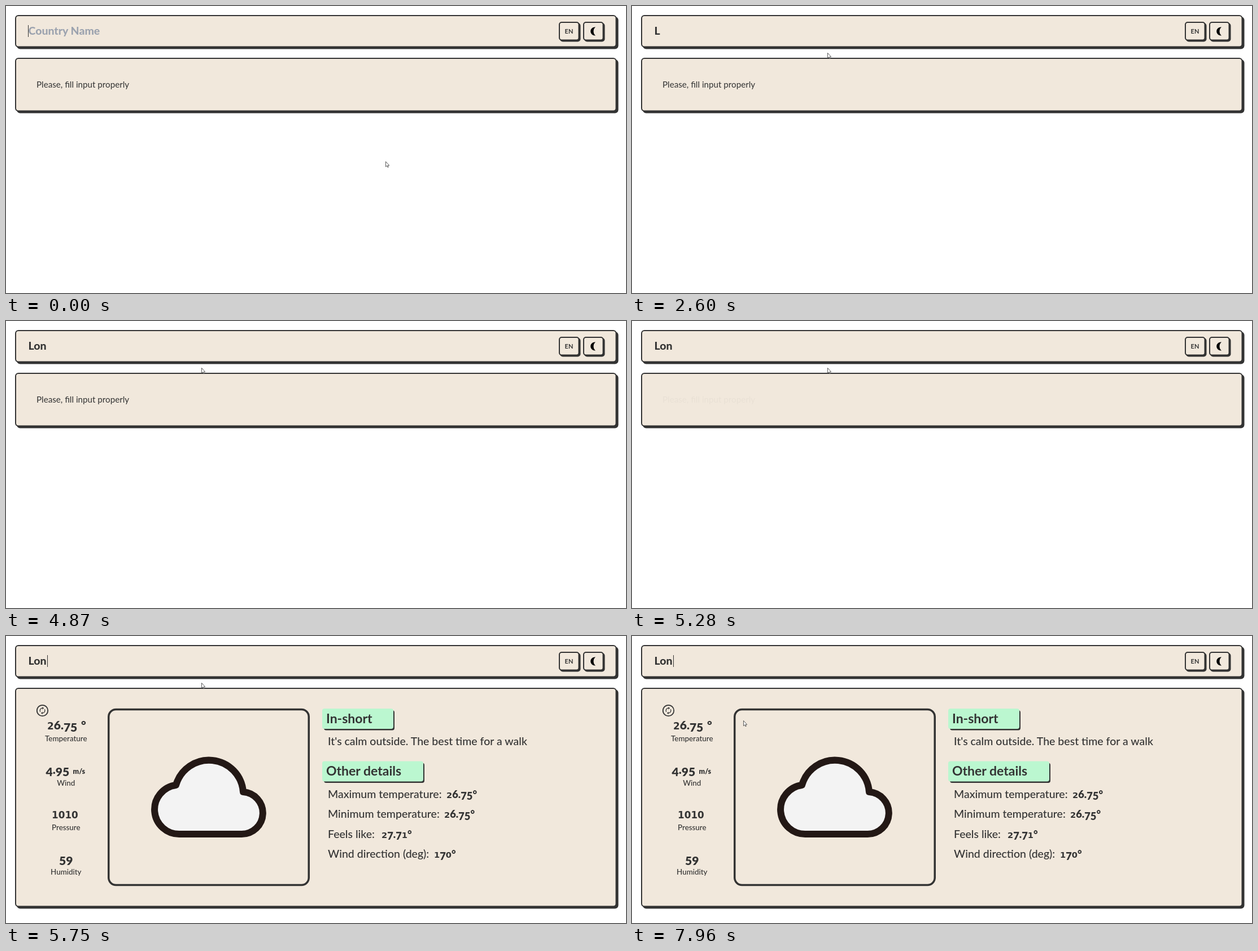
An HTML page for the animation above (8 s loop, 1098 px wide and 510 px high).

```html
<!DOCTYPE html>
<html lang="en">
<head>
<meta charset="utf-8">
<title>Weather search</title>
<style>
  html, body { margin: 0; width: 100%; height: 100%; overflow: hidden; background: #fff; }
  svg { display: block; width: 100%; height: 100%; font-family: Lato, "Open Sans", sans-serif; fill: #333; }
  .digit-small { font-family: "DejaVu Sans", sans-serif; font-weight: 700; }
</style>
</head>
<body>
<svg id="stage" viewBox="0 0 1098 510"></svg>
<script>
const INK = '#333', PAPER = '#f1e8dc', MINT = '#bbf7d0';
const LOOP = 8000, STEP = 70;

const text = (x, y, size, weight, content, extra = '') =>
  `<text x="${x}" y="${y}" font-size="${size}" font-weight="${weight}" ${extra}>${content}</text>`;

// Bordered box with a hard offset shadow; the edges are the outer border edges.
const box = (x, y, right, bottom, radius, offset) => {
  const w = right - x, h = bottom - y;
  return `<rect x="${x + offset}" y="${y + offset}" width="${w}" height="${h}" rx="${radius}"/>
    <rect x="${x + 1}" y="${y + 1}" width="${w - 2}" height="${h - 2}" rx="${radius - 1}"
      fill="${PAPER}" stroke="${INK}" stroke-width="2"/>`;
};

// Old-style figures: 0-2 at x-height, 3 4 5 7 9 hanging below the baseline.
const figures = (x, y, size, value) => text(x, y, size, 900, [...value].map(c => {
  if ('012'.includes(c)) return `<tspan class="digit-small" y="${y}" font-size="${size * 0.8}">${c}</tspan>`;
  return `<tspan y="${y + ('34579'.includes(c) ? size * 0.2 : 0)}">${c}</tspan>`;
}).join(''));

const heading = (y, right, label) => `
  <rect x="563" y="${y + 3}" width="${right - 561}" height="35.5" rx="4"/>
  <rect x="560" y="${y}" width="${right - 560}" height="36" rx="4" fill="${MINT}"/>
  ${text(567, y + 25.5, 23, 700, label)}`;

const metrics = [
  ['Temperature', 73, '26.75'], ['Wind', 70.5, '4.95'],
  ['Pressure', 81, '1010'], ['Humidity', 94, '59'],
];
const details = [
  ['Maximum temperature:', 780, '26.75°'], ['Minimum temperature:', 776, '26.75°'],
  ['Feels like:', 665, '27.71°'], ['Wind direction (deg):', 758, '170°'],
];

const cloud = `
  <path d="M308 352A43.7 43.7 0 0 1 301 265A60.7 60.7 0 0 1 420 277A37.55 37.55 0 0 1 417 352Z"
    fill="#f3f3f3" stroke="#231815" stroke-width="12" stroke-linejoin="round"/>`;
const refreshArrows = `
  <path transform="translate(57.1 125.1) scale(.62)" d="M12 6v3l4-4-4-4v3c-4.4 0-8 3.6-8 8 0 1.6.5 3 1.2 4.3
    l1.5-1.5c-.5-.8-.7-1.8-.7-2.8 0-3.3 2.7-6 6-6zm6.8 1.7L17.3 9.2c.4.8.7 1.8.7 2.8 0 3.3-2.7 6-6 6v-3
    l-4 4 4 4v-3c4.4 0 8-3.6 8-8 0-1.6-.5-3-1.2-4.3z"/>`;

const report = (cardBottom, firstLabel, spacing, icons) => `
  ${box(16, 92, 1081.5, cardBottom, 6, 3)}
  <circle cx="64.5" cy="132.5" r="9.7" fill="none" stroke="${INK}" stroke-width="1.8"/>
  ${metrics.map(([label, x, value], i) => {
    const y = firstLabel + i * spacing;
    return figures(x, y - 21, 21, value) + text(106.3, y, 13.4, 500, label, 'text-anchor="middle"');
  }).join('')}
  ${text(133, firstLabel - 21, 21, 900, '°')}
  ${text(118.5, firstLabel + spacing - 21, 12.5, 900, 'm/s')}
  <rect x="181.75" y="130.5" width="354.5" height="${cardBottom - 169.5}" rx="13"
    fill="none" stroke="${INK}" stroke-width="3.5"/>
  ${heading(129, 686, 'In-short')}
  ${text(570, 194, 19.5, 500, "It's calm outside. The best time for a walk")}
  ${heading(222.5, 739, 'Other details')}
  ${details.map(([label, x, value], i) => {
    const y = 287.5 + i * 35.6;
    return text(570, y, 19.5, 500, label) + figures(x, y, 18.3, value);
  }).join('')}
  ${icons}`;

document.getElementById('stage').innerHTML = `
  ${box(16, 16, 1081.5, 73.5, 6, 3)}
  ${text(39.5, 50.5, 19.5, 800, '', 'id="query"')}
  <rect id="caret" y="34" width="1" height="21"/>
  ${box(979, 28, 1015.5, 61.5, 5, 2)}
  ${text(997, 49, 11, 700, 'EN', 'text-anchor="middle"')}
  ${box(1022, 28, 1058.5, 61.5, 5, 2)}
  <path d="M1044 37.5A7.6 7.6 0 1 0 1044 52.5A9.8 9.8 0 0 1 1044 37.5Z" fill="#000"/>
  <g id="prompt">
    ${box(16, 92, 1081.5, 187.5, 6, 3)}
    ${text(54, 145, 15.2, 400, 'Please, fill input properly', 'id="hint"')}
  </g>
  <g id="loading">${report(438.5, 182, 68, '')}</g>
  <g id="loaded">${report(481.5, 187, 79, refreshArrows + cloud)}</g>
  <path id="pointer" d="M.5 .5V9.7L2.6 7.8L4 10.8L5.3 10.2L4 7.3H6.7Z"
    fill="#fff" stroke="${INK}" stroke-width=".8"/>`;

const [query, caret, prompt, hint, loading, loaded, pointer] =
  ['query', 'caret', 'prompt', 'hint', 'loading', 'loaded', 'pointer'].map(id => document.getElementById(id));

const keyTimes = [2070, 2730, 3330];
const caretX = [39, 50, 61, 73];
const caretToggles = [510, 1070, 1600, 2070, 2600, 2730, 3260, 3330, 3860,
  4350, 4870, 5420, 5940, 6470, 7000, 7560];
const moves = [
  { start: 510, end: 1000, from: [672, 276], to: [346, 83] },
  { start: 6400, end: 7100, from: [346, 83], to: [375, 156] },
  { start: 7750, end: 7960, from: [375, 156], to: [197, 150] },
];

const countPassed = (times, t) => times.filter(time => time <= t).length;
const show = (element, visible) => element.setAttribute('display', visible ? 'inline' : 'none');

function pointerAt(t) {
  const { start, end, from, to } = moves.findLast(m => t >= m.start) || moves[0];
  const elapsed = Math.floor(Math.max(0, t - start) / STEP) * STEP;
  const p = Math.min(1, elapsed / (end - start));
  const eased = p * p * (3 - 2 * p);
  return from.map((v, i) => v + (to[i] - v) * eased);
}

function draw(t) {
  const typed = countPassed(keyTimes, t);
  query.textContent = typed ? 'Lon'.slice(0, typed) : 'Country Name';
  query.setAttribute('fill', typed ? INK : '#9ca3af');
  caret.setAttribute('x', caretX[typed]);
  show(caret, countPassed(caretToggles, t) % 2 === 0);

  const fadeSteps = t < 5070 ? 0 : Math.min(4, Math.floor((t - 5070) / STEP) + 1);
  hint.setAttribute('opacity', 1 - fadeSteps * 0.24);
  show(prompt, t < 5420);
  show(loading, t >= 5420 && t < 5750);
  show(loaded, t >= 5750);
  pointer.setAttribute('transform', `translate(${pointerAt(t)})`);
}

const began = performance.now();
function tick() {
  draw((performance.now() - began) % LOOP);
  requestAnimationFrame(tick);
}
tick();
</script>
</body>
</html>
```
